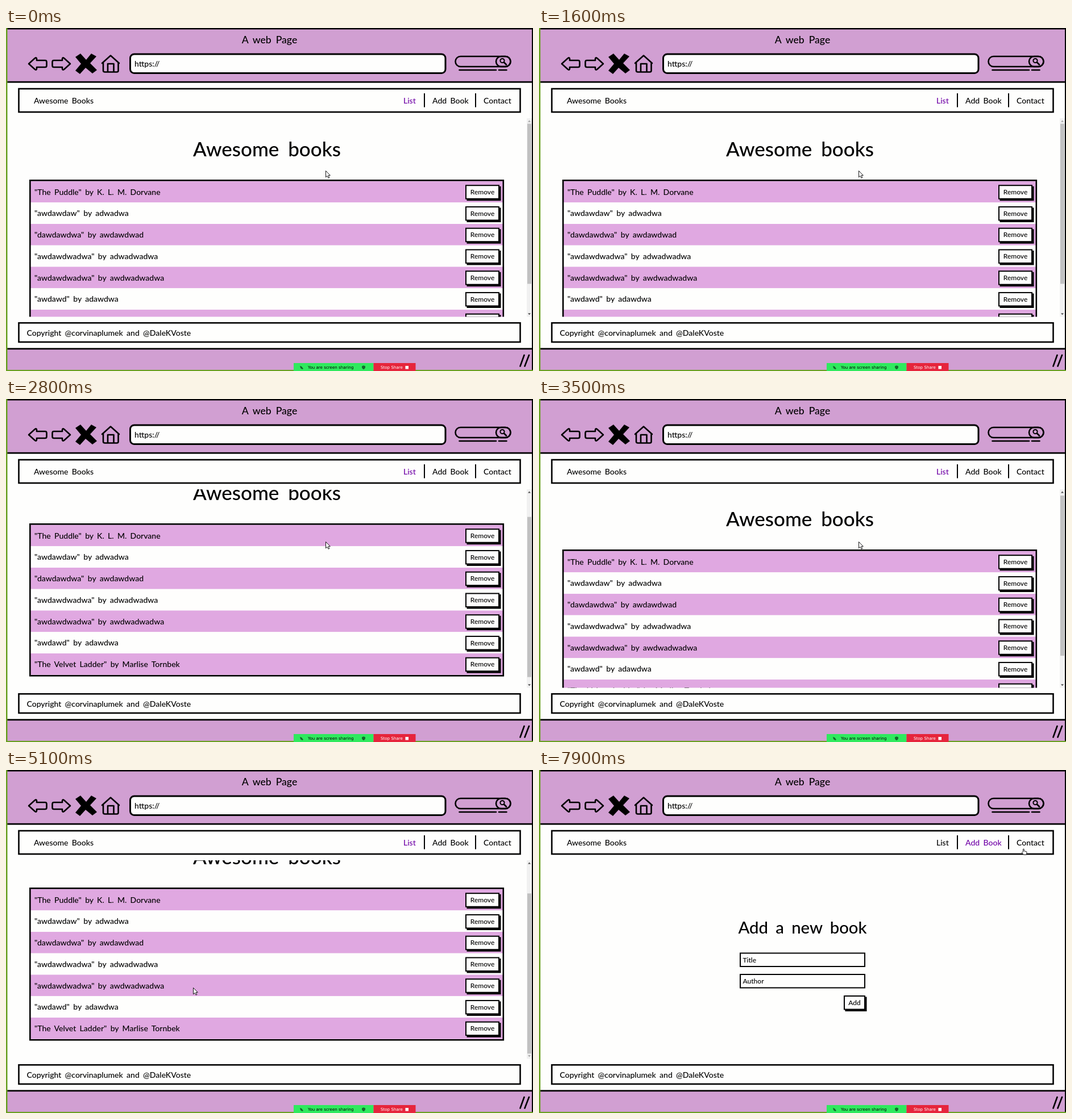
These frames come from a looping animation (927 px wide and 604 px high, 8000 ms). An HTML page:

```html
<!DOCTYPE html>
<html lang="en">
<head>
<meta charset="utf-8">
<title>Awesome books</title>
<style>
html, body { margin: 0; width: 100%; height: 100%; overflow: hidden; background: #fefefd; }
svg { display: block; width: 927px; height: 604px; }
text { font: 500 14px Lato, sans-serif; word-spacing: .2em; white-space: pre; }
.title { font-size: 17.6px; }
.h1 { font-size: 35px; }
.h2 { font-size: 29.3px; }
.small { font-size: 12px; }
.share { font: 7.1px "DejaVu Sans", sans-serif; word-spacing: 0; }
.mid { text-anchor: middle; }
.active { fill: #6f00a6; }
.box { fill: #fefefd; stroke: #000; stroke-width: 2.6; }
.thin { stroke-width: 2; }
.line { fill: none; stroke: #000; stroke-width: 2.6; stroke-linejoin: round; stroke-linecap: round; }
.lilac { fill: #d19fd2; }
.pointer { fill: #fff; stroke: #000; stroke-width: .9; stroke-linejoin: round; }
</style>
</head>
<body>
<svg viewBox="0 0 927 604">
  <clipPath id="view"><rect y="159" width="927" height="349.5"/></clipPath>
  <rect width="927" height="604" fill="#fefefd"/>

  <!-- browser frame -->
  <rect class="lilac" y="2" width="927" height="92"/>
  <rect class="lilac" y="566" width="927" height="37"/>
  <path d="M0 0H927V604H925V2.6H0ZM0 93.8H927V96.5H0ZM0 563.5H927V566.2H0Z"/>
  <path d="M0 0H2.5V602H927V604H0Z" fill="#699f22"/>
  <text class="title mid" x="463.5" y="27">A web Page</text>
  <path id="arrow" class="line" d="M40 63L51 53Q54 51 54 55V57H69Q71.500 57 71.500 60V66Q71.500 69 69 69H54V71Q54 75 51 73Z"/>
  <use href="#arrow" transform="matrix(-1 0 0 1 153 0)"/>
  <path d="M122 51L131 45 141 56 150 45 159 50 148 62 160 74 152 80 140 70 130 81 122 75 132 63Z"/>
  <path class="line" d="M171 61V75Q171 77.500 174 77.500H195Q197.500 77.500 197.500 75V61M169 62L184 48.500 199 62M179 77V63H189.500V77"/>
  <rect class="box" x="218.500" y="46" width="554.500" height="33.500" rx="7" style="stroke-width:3"/>
  <text x="226" y="68">https://</text>
  <g class="line">
    <rect x="790.500" y="50" width="97" height="18" rx="9"/>
    <rect x="862" y="50" width="25.500" height="18" rx="9"/>
    <circle cx="873" cy="57.500" r="3.600" stroke-width="2"/>
    <path d="M876 60.500L880 64.500M797.500 74H862M867 74H880.500M904.500 595.500L911.500 576M912.500 595.500L920 576"/>
  </g>

  <!-- navigation and footer -->
  <rect class="box" x="22.500" y="107" width="882" height="41"/>
  <text x="49" y="132.500">Awesome Books</text>
  <text id="navList" x="699" y="132.500">List</text>
  <text id="navAdd" x="750" y="132.500">Add Book</text>
  <text x="840" y="132.500">Contact</text>
  <path d="M735 115h2v24.500h-2zM825 115h2v24.500h-2z"/>
  <rect class="box" x="22.500" y="519.300" width="882" height="33.700"/>
  <text x="36.500" y="541.500">Copyright @corvinaplumek and @DaleKVoste</text>

  <!-- list page -->
  <g id="listPage">
    <g clip-path="url(#view)">
      <g id="content">
        <text class="h1 mid" x="459" y="225.500">Awesome books</text>
        <g id="rows"></g>
        <rect class="box" x="42.300" y="268.300" width="832.500" height="267" style="fill:none"/>
      </g>
    </g>
    <rect x="916" y="159" width="9" height="349.500" fill="#f1f1f1"/>
    <rect id="thumb" x="917" y="168.500" width="7" height="282" fill="#c1c1c1"/>
    <path id="up" d="M918 165.500h5l-2.500-3z"/>
    <path id="down" d="M918 502.300h5l-2.500 3z"/>
  </g>

  <!-- form page -->
  <g id="formPage">
    <text class="h2 mid" x="463.500" y="287.500">Add a new book</text>
    <rect class="box thin" x="354" y="322.500" width="219" height="23.500"/>
    <text class="small" x="358.500" y="338.500">Title</text>
    <rect class="box thin" x="354" y="360" width="219" height="23.500"/>
    <text class="small" x="358.500" y="376">Author</text>
    <g id="addButton"></g>
  </g>

  <!-- screen sharing bar -->
  <rect x="506" y="590" width="140.500" height="14" fill="#2fe95e"/>
  <rect x="646.500" y="590" width="74" height="14" fill="#e6253c"/>
  <path d="M517 595l3 1 3 4-2 1-3-2zM626 595.500l3-1.300 3 1.300v2.500q-1 2.500-3 3.300-2-.8-3-3.300z" fill="#146c2d"/>
  <text class="share" x="531" y="600">You are screen sharing</text>
  <text class="share" x="659" y="600" fill="#fff">Stop Share</text>
  <rect x="702.500" y="595" width="5.500" height="5.500" fill="#fff"/>

  <g id="cursor">
    <path class="pointer" d="M.5 .5V11.800L3.100 9.400 5 13.200 6.800 12.400 5 8.600H8.300Z"/>
    <path class="pointer" d="M3 5.500V1.300a.9.9 0 0 1 1.800 0V4.300l3.900.8q1 .3.8 1.400L9 10.500H4L.6 7q.6-1 1.400-.5z"/>
    <path class="line" style="stroke-width:1" d="M1.500 .5q2 0 2.500 1 .5-1 2.500-1M4 1.500V12.500M1.500 13.500q2 0 2.500-1 .5 1 2.500 1"/>
  </g>
</svg>
<script>
const $ = id => document.getElementById(id);
const LOOP = 8000, FORM_OPENS = 6300, MAX_SCROLL = 60, ROW = 37.75;
const ARROW = 0, HAND = 1, BEAM = 2;

const books = [
  '"The Puddle" by K. L. M. Dorvane',
  '"awdawdaw" by adwadwa',
  '"dawdawdwa" by awdawdwad',
  '"awdawdwadwa" by adwadwadwa',
  '"awdawdwadwa" by awdwadwadwa',
  '"awdawd" by adawdwa',
  '"The Velvet Ladder" by Marlise Tornbek'
];

const button = (x, y, w, label) => `
  <rect x="${x + 2.5}" y="${y + 2.5}" width="${w}" height="25.5"/>
  <rect class="box thin" x="${x + 1}" y="${y + 1}" width="${w - 2}" height="23.5"/>
  <text class="small mid" x="${x + w / 2}" y="${y + 16.7}">${label}</text>`;

$('rows').innerHTML = books.map((book, i) => {
  const y = 269.5 + i * ROW;
  return `<rect x="42" y="${y}" width="833" height="${ROW}" fill="${i % 2 ? '#fefefd' : '#e0a8e1'}"/>
    <text x="50" y="${y + 24}">${book}</text>` + button(808, y + 6.7, 60, 'Remove');
}).join('');
$('addButton').innerHTML = button(536, 397, 38, 'Add');

// Stepped keyframes: [time, scroll offset] and [time, x, y, shape]
const scrolls = [
  [0, 0], [500, 16], [700, 60], [1400, 48], [1500, 12], [1600, 0],
  [2100, 8], [2200, 57], [2400, 60], [2800, 48], [2900, 12], [3000, 0],
  [3500, 2], [3600, 42], [3700, 60]
];
const moves = [
  [0, 562, 251], [4500, 566, 248],
  [4700, 567, 246], [4800, 520, 280], [4900, 430, 340], [5000, 350, 375], [5100, 329, 383],
  [5300, 331, 384], [5400, 480, 320], [5500, 720, 200], [5600, 809, 161],
  [5800, 815, 150], [5900, 821, 141],
  [6100, 805, 135, HAND], [6200, 788, 131, HAND], [6300, 784, 132, HAND],
  [6600, 786, 131, HAND], [6700, 787, 131, HAND],
  [6900, 770, 150], [7000, 640, 250], [7100, 540, 323, BEAM],
  [7300, 480, 345], [7400, 433, 362, BEAM],
  [7600, 436, 366, BEAM], [7700, 600, 270], [7800, 800, 160], [7900, 848.5, 138.5, HAND]
];
const at = (keys, t) => keys.findLast(key => key[0] <= t);
const show = (el, on) => el.style.display = on ? '' : 'none';

function draw(now) {
  const t = now % LOOP;
  const [, scroll] = at(scrolls, t);
  const [, x, y, shape = ARROW] = at(moves, t);
  const form = t >= FORM_OPENS;

  show($('listPage'), !form);
  show($('formPage'), form);
  $('navList').classList.toggle('active', !form);
  $('navAdd').classList.toggle('active', form);

  $('content').setAttribute('transform', `translate(0 ${-scroll})`);
  $('thumb').setAttribute('y', 168.5 + scroll * .815);
  $('up').setAttribute('fill', scroll > 0 ? '#505050' : '#a3a3a3');
  $('down').setAttribute('fill', scroll < MAX_SCROLL ? '#505050' : '#a3a3a3');

  $('cursor').setAttribute('transform', `translate(${x} ${y})`);
  [...$('cursor').children].forEach((el, i) => show(el, i === shape));
  requestAnimationFrame(draw);
}
draw(performance.now());
</script>
</body>
</html>
```
